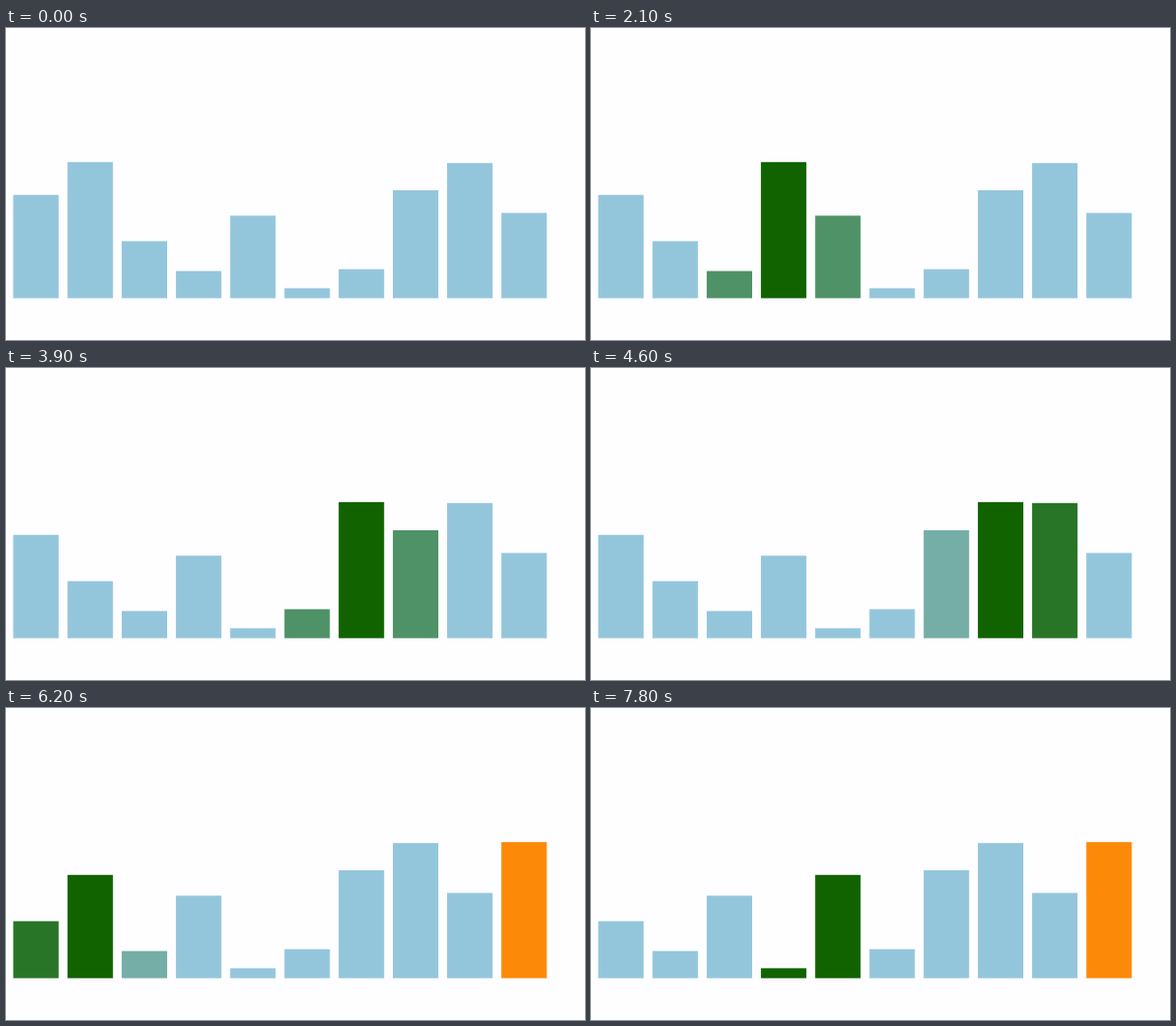
These frames come from a looping animation (600x323 px, 8 s). A matplotlib script:

```python
import matplotlib.pyplot as plt
from matplotlib.animation import FuncAnimation
from matplotlib.colors import to_rgb

W, H, DPI = 600, 323, 100
FRAMES, INTERVAL = 80, 100

LEFT, PITCH, BAR_WIDTH, BASE = 7.5, 56.2, 47.1, 279.7
TOPS = [172.8, 138.8, 220.7, 251.6, 194.3, 269.4, 249.7, 168.0, 139.8, 191.5]

BACKGROUND = "#fefdff"
IDLE, ACTIVE, SORTED = map(to_rgb, ("#94c6db", "#116300", "#fc8a08"))

FIRST_COMPARE = 5
COMPARE_FRAMES = 3
SWAP_FRAMES = 3
RISE = (0.24, 0.53, 0.82)   # idle to active
FADE = (0.18, 0.47, 0.76)   # active to idle or sorted
SWAP_START = 0.9            # progress on the first frame of a swap


def mix(a, b, t):
    return tuple(u + (v - u) * t for u, v in zip(a, b))


def bubble_sort_steps():
    """Return comparisons as (start, slot, swaps, order, old colours, new colours)."""
    order = list(range(len(TOPS)))
    colours = [IDLE] * len(TOPS)
    start, steps = FIRST_COMPARE, []
    for end in range(len(TOPS) - 1, 0, -1):
        for slot in range(end):
            if start >= FRAMES:
                return steps
            pair = order[slot:slot + 2]
            done = order[end + 1:]
            target = [ACTIVE if bar in pair else SORTED if bar in done else IDLE
                      for bar in range(len(TOPS))]
            swaps = TOPS[pair[0]] < TOPS[pair[1]]
            steps.append((start, slot, swaps, order[:], colours, target))
            if swaps:
                order[slot:slot + 2] = pair[::-1]
            colours = target
            start += COMPARE_FRAMES + SWAP_FRAMES * swaps
    return steps


STEPS = bubble_sort_steps()


def state(frame):
    """Slot position and colour of every bar at a frame."""
    if frame < FIRST_COMPARE:
        return list(range(len(TOPS))), [IDLE] * len(TOPS)
    start, slot, swaps, order, old, new = [s for s in STEPS if s[0] <= frame][-1]
    age = frame - start
    places = [order.index(bar) for bar in range(len(TOPS))]
    if age < COMPARE_FRAMES:
        colours = [mix(a, b, (RISE if b == ACTIVE else FADE)[age])
                   for a, b in zip(old, new)]
    else:
        colours = new
        if swaps:
            shift = SWAP_START if age == COMPARE_FRAMES else 1
            places[order[slot]] += shift
            places[order[slot + 1]] -= shift
    return places, colours


fig = plt.figure(figsize=(W / DPI, H / DPI), dpi=DPI, facecolor=BACKGROUND)
ax = fig.add_axes([0, 0, 1, 1])
ax.set_xlim(0, W)
ax.set_ylim(H, 0)
ax.axis("off")

bars = [ax.add_patch(plt.Rectangle((LEFT + PITCH * i, top), BAR_WIDTH, BASE - top,
                                   facecolor=IDLE, linewidth=0, snap=False))
        for i, top in enumerate(TOPS)]


def update(frame):
    for bar, place, colour in zip(bars, *state(frame)):
        bar.set_x(LEFT + PITCH * place)
        bar.set_facecolor(colour)
    return bars


anim = FuncAnimation(fig, update, frames=FRAMES, interval=INTERVAL,
                     init_func=lambda: update(0), repeat=True, repeat_delay=0)
plt.show()
```
